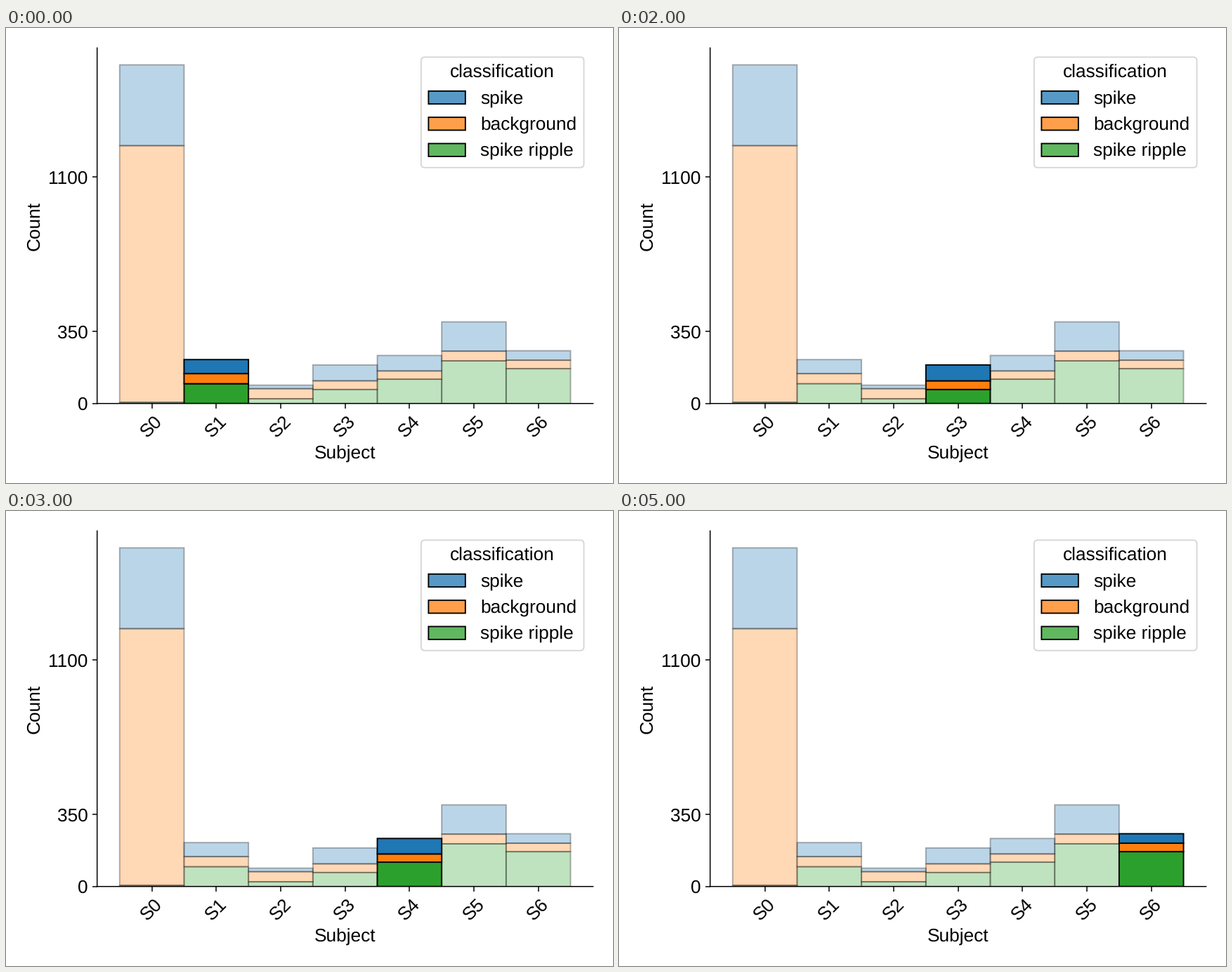
Write a matplotlib script that moves like this. It is 864 by 648 pixels and loops after 6 s.

```python
import matplotlib.pyplot as plt
import numpy as np
from matplotlib.animation import FuncAnimation
from matplotlib.colors import to_rgba
from matplotlib.patches import Patch

W, H, DPI = 864, 648, 135
DIM = 0.3

# unhinted text and unsnapped lines keep fractional pixel positions
plt.rcParams.update({"font.family": "Liberation Sans", "font.size": 14,
                     "text.hinting": "none"})

BLUE, ORANGE, GREEN = "#1f77b4", "#ff7f0e", "#2ca02c"
# cumulative counts per subject, from the bottom of each stack
LEVELS = [
    (GREEN, [6, 96, 23, 68, 118, 207, 169]),
    (ORANGE, [1251, 145, 72, 110, 158, 254, 210]),
    (BLUE, [1643, 213, 89, 187, 233, 396, 256]),
]
subjects = np.arange(7)

fig = plt.figure(figsize=(W / DPI, H / DPI), dpi=DPI, facecolor="white")
left, right, top, bottom = 129.7, 835.65, 28.35, 534.75
ax = fig.add_axes([left / W, 1 - bottom / H, (right - left) / W, (bottom - top) / H])

layers = []
base = np.zeros(len(subjects))
for color, level in LEVELS:
    level = np.array(level, float)
    layers.append(ax.bar(subjects, level - base, width=1, bottom=base, color=color,
                         edgecolor="black", linewidth=1, alpha=DIM, snap=False))
    base = level

ax.set_xlim(-0.85, 6.85)
ax.set_ylim(0, 1643 * 1.05)
ax.set_yticks([0, 350, 1100])
ax.set_xticks(subjects, [f"S{i}" for i in subjects], rotation=45)
ax.set_xlabel("Subject")
ax.set_ylabel("Count")
ax.spines[["top", "right"]].set_visible(False)
ax.spines[["left", "bottom"]].set_snap(False)
for line in ax.get_xticklines() + ax.get_yticklines():
    line.set_snap(False)

keys = [(BLUE, "spike"), (ORANGE, "background"), (GREEN, "spike ripple")]
handles = [Patch(facecolor=to_rgba(color, 0.75), edgecolor="black", linewidth=1, label=name)
           for color, name in keys]
legend = ax.legend(handles=handles, title="classification", loc="upper right")
for patch in [legend.get_frame(), *legend.get_patches()]:
    patch.set_snap(False)


def draw(i):
    """Highlight one subject's stack, starting with S1."""
    for layer in layers:
        for n, bar in enumerate(layer):
            bar.set_alpha(1 if n == i + 1 else DIM)
    return [bar for layer in layers for bar in layer]


anim = FuncAnimation(fig, draw, frames=6, interval=1000, repeat=True, repeat_delay=0)
plt.show()
```
